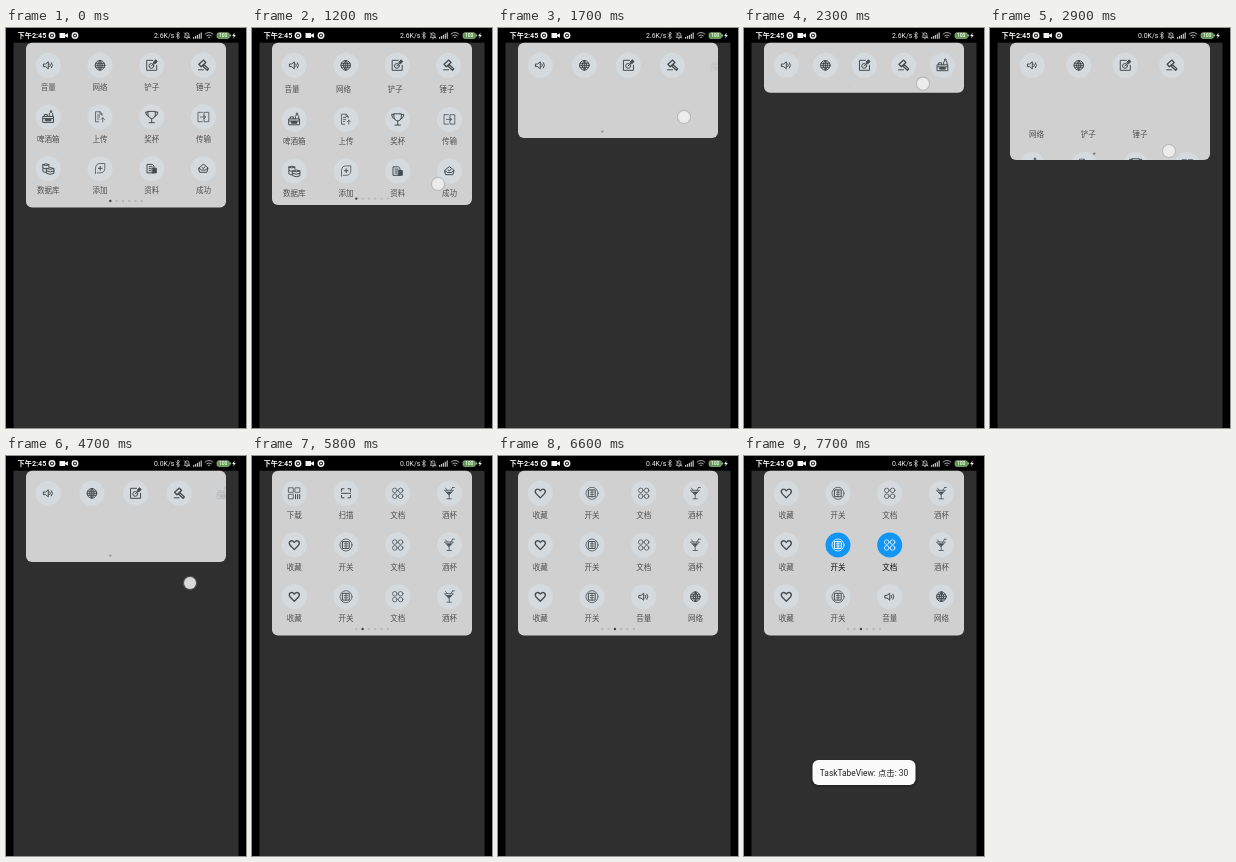
These frames come from a looping animation (240x400 px, 8 s). An HTML page:

```html
<!DOCTYPE html>
<html lang="zh">
<head>
<meta charset="utf-8">
<title>Quick settings panel</title>
<style>
  html, body { margin: 0; width: 100%; height: 100%; overflow: hidden; background: #000; }
  svg { display: block; width: 100vw; height: 100vh; }
  text { font-family: Roboto, "Noto Sans CJK SC", "Noto Sans CJK", sans-serif; }
  .disc { fill: #d4dade; }
  .label { font-size: 7.5px; fill: #505050; text-anchor: middle; }
  .icon { fill: none; stroke: #454a4f; stroke-width: 1; stroke-linecap: round; stroke-linejoin: round; }
  .icon .solid { fill: #454a4f; }
  .icon .fine { stroke-width: .75; }
  .icon .bold { stroke-width: 1.3; }
  .on .disc { fill: #1296f5; }
  .on .label { fill: #111; }
  .on .icon { stroke: #fff; }
  .on .icon .solid { fill: #fff; }
  .status { fill: #f2f2f2; font-size: 7.2px; font-weight: 500; }
  .line { fill: none; stroke: #d8d8d8; stroke-width: .75; }
</style>
</head>
<body>
<svg viewBox="0 0 240 400" preserveAspectRatio="none">
  <defs>
    <clipPath id="panelClip"><rect class="sheet" x="20" y="14.7" width="200" rx="6"/></clipPath>
    <filter id="soft" x="-20%" y="-40%" width="140%" height="180%"><feGaussianBlur stdDeviation="1.6"/></filter>
  </defs>
  <rect width="240" height="400"/>
  <rect x="7.5" y="14.7" width="225" height="386" fill="#2f2f2f"/>

  <g class="status">
    <text x="11.5" y="10.2" font-weight="700">下午2:45</text>
    <text id="speed" x="148" y="10.1" font-size="6.9" font-weight="400"></text>
    <g fill="none" stroke="#f2f2f2" stroke-width="1.5">
      <circle cx="46" cy="7.5" r="2.7"/><circle cx="69" cy="7.5" r="2.7"/>
    </g>
    <circle cx="46" cy="7.5" r="1.1"/><circle cx="69" cy="7.5" r="1.1"/>
    <path d="M53.5 5h5.5v1.8l3-1.6v4.6l-3-1.6v1.8h-5.5z"/>
    <path class="line" d="M170 5.6l3.6 3.6-1.8 1.7V4l1.8 1.7L170 9.3"/>
    <path class="line" d="M178.3 9.4h5.4l-.8-1.2V6.7a1.9 1.9 0 0 0-3.8 0v1.5zM180.2 10.7h1.6M178 4.5l6 6"/>
    <path opacity=".8" d="M187 9h1.2v1.8H187zM188.9 8h1.2v2.8h-1.2zM190.8 6.9h1.2v3.9h-1.2zM192.7 5.8h1.2v5h-1.2zM194.6 4.6h1.2v6.2h-1.2z"/>
    <path class="line" d="M198.8 6.3q4.2-3.6 8.4 0M200.3 8q2.7-2.2 5.4 0M201.8 9.6q1.2-.9 2.4 0"/>
    <rect x="211" y="4.7" width="12.5" height="5.8" rx="1.9" fill="#5c9a4c" stroke="#a9c79f" stroke-width=".6"/>
    <path d="M224.3 6.6h.8v2h-.8zM228.6 4.5l-2.4 3.5h1.5l-.5 2.6 2.6-3.5h-1.6z"/>
    <text x="217.2" y="9.4" font-size="5" text-anchor="middle" fill="#fff">100</text>
  </g>

  <rect class="sheet" x="20" y="14.7" width="200" rx="6" fill="#d0d0d0"/>
  <g clip-path="url(#panelClip)">
    <g id="pages"></g>
    <g id="dots"></g>
  </g>

  <g id="toast">
    <rect x="68" y="305" width="104" height="25" rx="6" opacity=".4" filter="url(#soft)"/>
    <rect x="68.5" y="304" width="103" height="25" rx="6" fill="#fafafa"/>
    <text id="message" x="120" y="319.5" font-size="8.4" text-anchor="middle" fill="#222"></text>
  </g>
  <g id="touch">
    <circle r="7.2" fill="#999" opacity=".35"/>
    <circle r="6" fill="#f6f6f6" opacity=".82"/>
  </g>
</svg>
<script>
const PERIOD = 8000, STEP = 100;
const TOP = 14.7, FULL = 179.4, FOLDED = 62;
const COLUMN = 51.7, FIRST_X = 42.3, FIRST_Y = 37.3, PAGE_WIDTH = 200;
const $ = id => document.getElementById(id);
const path = (d, style = '') => `<path d="${d}" class="${style}"/>`;
const ring = (x, y, r, style = '') => `<circle cx="${x}" cy="${y}" r="${r}" class="${style}"/>`;

// Icons are centred on the origin, about 12 units wide.
const icons = {
  音量: path('M-4.5-1.3h1.8L0-3.5v7l-2.7-2.2h-1.8z') + path('M1.6-1.4q1 1.4 0 2.8M3.2-2.6q2 2.6 0 5.2'),
  网络: ring(0, 0, 4.8) + path('M-4.8 0H4.8M0-4.8V4.8M-4.2-2h8.4M-4.2 2h8.4M0-4.8q-4.8 4.8 0 9.6M0-4.8q4.8 4.8 0 9.6'),
  铲子: path('M1-5h-6V5H5V0') + ring(-.3, .6, 2.4) + path('M-.3.6L3-2.7') + path('M1.8-3.4L4-5.5 5.6-3.7 3.4-1.6z', 'solid'),
  锤子: path('M-4.6-1L.2-5.2 2.4-2.8-2.3 1.5zM.5-.8l4.7 4.4-1.3 1.4L-1 .5', 'bold') + path('M-5 4.5h5'),
  啤酒箱: path('M-5.2-.5H5.2V5.4H-5.2zM-4-.5v-2h3v2M1-.5v-2.7l1-1v-2h1.4v2l1 1v2.7') + path('M-5 1.6H5') + path('M-2.6 2.2h5.2v1.6h-5.2z', 'solid'),
  上传: path('M2-1.5v-1.9L.2-5.2h-4.7V4.8h3.2M0-5v2h2M-2.7-2h2.4M-2.7 0h2.4M-2.7 2h1.5M2.8 4.8V.8M1.2 2.4L2.8.8l1.6 1.6', 'fine'),
  奖杯: path('M-3.6-5.6h7.2v4Q3 1.3 0 1.7-3 1.3-3.6-1.6zM-3.6-5h-2.5Q-6-1-3-.4M3.6-5h2.5Q6-1 3-.4M0 1.7v3.5M-2.7 5.7h5.4'),
  传输: path('M-1-4.7h-4.4v9.4H-1M1-4.7h4.4v9.4H1zM-3 0h5M.7-1.6L2.3 0 .7 1.6', 'fine'),
  数据库: path('M-5.4-4q3-2 6 0v2M-5.4-4q3 2 6 0M-5.4-4v6.8q1 .9 2.8.9M-5.4-.8q1 .9 2.8.9M-1.6-.2q3.6-2 7.2 0v4.9q-3.6 2-7.2 0zM-1.6-.2q3.6 2 7.2 0M-1.6 2.3q3.6 2 7.2 0'),
  添加: path('M-4.5 5V-.5Q-4.2-5.2.2-5.2H4.8V0Q4.4 4.2 0 4.2h-2.8', 'fine') + path('M-1.7-.4h3.8M.2-2.3v3.8'),
  资料: path('M-4.3-4.3h5l1.6 1.6v6.9h-6.6zM-2.6-2h3M-2.6 0h2M-2.6 2h1.5') + path('M.8-.5h3.8v4.7H.8z', 'solid'),
  成功: path('M-4.6-.6L-2-3.2 0-4.3l2 1.1 2.6 2.6-1.2 4.2h-6.8zM-4.4-.4l2.7 1.8h3.4L4.4-.4M-1.5-1.4L-.2-.2 1.8-2'),
  下载: path('M-5.5-5.5h4.5v4.5h-4.5zM1-5.5h4.5V-1H1zM-5.5 1H-1v4.5h-4.5z', 'fine') + path('M1.2 1.2v4.2M3.3 1.2v4.2M5.4 1.2v4.2'),
  扫描: path('M-4.5-2v-2.5H-2M2-4.5h2.5V-2M4.5 2v2.5H2M-2 4.5h-2.5V2M-4.5 0h9'),
  文档: [-2.9, 2.9].flatMap(x => [-2.9, 2.9].map(y => ring(x, y, 2.3, 'fine'))).join(''),
  酒杯: path('M-4.6-3H4L-.2 1.4zM-.2 1.4V5.4M-2.4 5.5h4.4M1.2-2.6l2-3.2M3-5.8h2M-4-5.2l2 2.2', 'fine') + path('M-2.6-1.2h4.8L-.2 1z', 'solid fine'),
  收藏: path('M0 4.6L-4.2.3Q-5.9-2-4.2-3.7-1.9-5.2 0-2.5 1.9-5.2 4.2-3.7 5.9-2 4.2.3z', 'bold'),
  开关: ring(0, 0, 6, 'fine') + path('M-3.2-3.4h6.4V3.4h-6.4z') + path('M0-3.2V3.2M-1.6-1.2h3.2M-1.6 1h3.2', 'fine')
};

const pageNames = [
  '音量 网络 铲子 锤子 啤酒箱 上传 奖杯 传输 数据库 添加 资料 成功',
  '下载 扫描 文档 酒杯 收藏 开关 文档 酒杯 收藏 开关 文档 酒杯',
  '收藏 开关 文档 酒杯 收藏 开关 文档 酒杯 收藏 开关 音量 网络'
].map(row => row.split(' '));

const svgGroup = (parent, html) => {
  const g = document.createElementNS('http://www.w3.org/2000/svg', 'g');
  g.innerHTML = html;
  return parent.appendChild(g);
};
const move = (node, x, y) => node.setAttribute('transform', `translate(${x} ${y})`);
const show = (node, alpha) => node.setAttribute('opacity', Math.max(0, Math.min(1, alpha)));
const button = name => `<g class="face"><circle class="disc" r="12.5"/><g class="icon">${icons[name]}</g></g>`;
const caption = name => `<g class="caption"><text class="label" y="24.6">${name}</text></g>`;

const cells = pageNames.flatMap((names, page) => names.map((name, i) => {
  const node = svgGroup($('pages'), button(name) + caption(name));
  return {
    node, page, column: i % 4, row: Math.floor(i / 4),
    face: node.querySelector('.face'), caption: node.querySelector('.caption')
  };
}));
const fifth = svgGroup($('pages'), button('啤酒箱'));
const dots = Array.from({ length: 6 }, () => svgGroup($('dots'), '<circle r="1.2"/>'));
const sheets = document.querySelectorAll('.sheet');

// Linear interpolation over [time, value] keys.
function track(keys, t) {
  const next = keys.findIndex(k => k[0] > t);
  if (next < 0) return keys[keys.length - 1][1];
  if (next === 0) return keys[0][1];
  const [t0, a] = keys[next - 1], [t1, b] = keys[next];
  return a + (b - a) * (t - t0) / (t1 - t0);
}

const bottomKeys = [
  [1100, FULL], [1200, 177], [1700, 110], [1800, 83], [1900, FOLDED],
  [2200, FOLDED], [2500, 70], [2700, 92], [2900, 132], [3000, 156], [3100, 175], [3200, FULL],
  [3600, FULL], [3700, 170], [3800, 152.6], [4000, 115], [4200, 70], [4300, FOLDED],
  [4500, FOLDED], [4600, 80], [4700, 106], [4800, 137], [4900, 162], [5000, 176], [5100, FULL]
];
const pageKeys = [
  [5300, 0], [5400, .12], [5500, .42], [5600, .8], [5700, .97], [5800, 1],
  [5900, 1.35], [6000, 1.78], [6100, 1.98], [6200, 2]
];

// Finger gestures; vertical drags keep a fixed offset to the sheet's lower edge.
const overshoot = t => track([[2900, 0], [3100, 18]], t);
const gestures = [
  { from: 1100, to: 1800, at: s => [186, s.bottom - 21] },
  { from: 2100, to: 3200, at: s => [179, s.bottom - 9 + overshoot(s.t)] },
  { from: 3500, to: 4100, at: s => [184, s.bottom - 57.6] },
  { from: 4500, to: 5100, at: s => [184, s.bottom + 21] },
  { from: 5300, to: 5600, at: s => [180 - PAGE_WIDTH * s.page, 115] },
  { from: 5900, to: 6100, at: s => [180 - PAGE_WIDTH * (s.page - 1), 115] },
  { from: 7000, to: 7200, at: () => [94, 89] },
  { from: 7300, to: 7500, at: () => [146, 89] }
];

function drawCells(drop, page) {
  const gap = COLUMN - drop * .11;
  for (const c of cells) {
    const folds = c.row === 0;
    show(c.node, Math.abs(c.page - page) < 1 ? 1 : 0);
    move(c.node, FIRST_X + (c.page - page) * PAGE_WIDTH, FIRST_Y + c.row * COLUMN + (folds ? 0 : drop));
    move(c.face, c.column * (folds ? gap : COLUMN), 0);
    move(c.caption, c.column * COLUMN - (folds ? drop : 0), folds ? drop : 0);
  }
  move(fifth, FIRST_X + 4 * gap, FIRST_Y);
  show(fifth, (drop - 66) / 50);
}

function drawDots(drop, bottom, page) {
  const active = Math.round(page);
  dots.forEach((dot, i) => {
    move(dot, 104.3 + i * 6.3, bottom - 6.4);
    dot.setAttribute('fill', i === active ? '#444' : '#b8b8b8');
    show(dot, i === active ? 1 - drop / 118 : 1 - drop / 25);
  });
}

function draw(t) {
  const bottom = track(bottomKeys, t), page = track(pageKeys, t), drop = FULL - bottom;
  sheets.forEach(s => s.setAttribute('height', bottom - TOP));
  drawCells(drop, page);
  drawDots(drop, bottom, page);

  const gesture = gestures.find(g => t >= g.from && t < g.to);
  show($('touch'), gesture ? 1 : 0);
  if (gesture) move($('touch'), ...gesture.at({ t, bottom, page }));

  cells[29].node.classList.toggle('on', t >= 7200);
  cells[30].node.classList.toggle('on', t >= 7500);
  show($('toast'), track([[7200, 0], [7400, 1]], t));
  $('message').textContent = `TaskTabeView: 点击: ${t < 7500 ? 29 : 30}`;
  $('speed').textContent = t < 2400 ? '2.6K/s' : t < 6600 ? '0.0K/s' : '0.4K/s';
}

let start;
function tick(now) {
  start ??= now;
  draw(Math.floor((now - start) % PERIOD / STEP) * STEP);
  requestAnimationFrame(tick);
}
draw(0);
requestAnimationFrame(tick);
</script>
</body>
</html>
```
